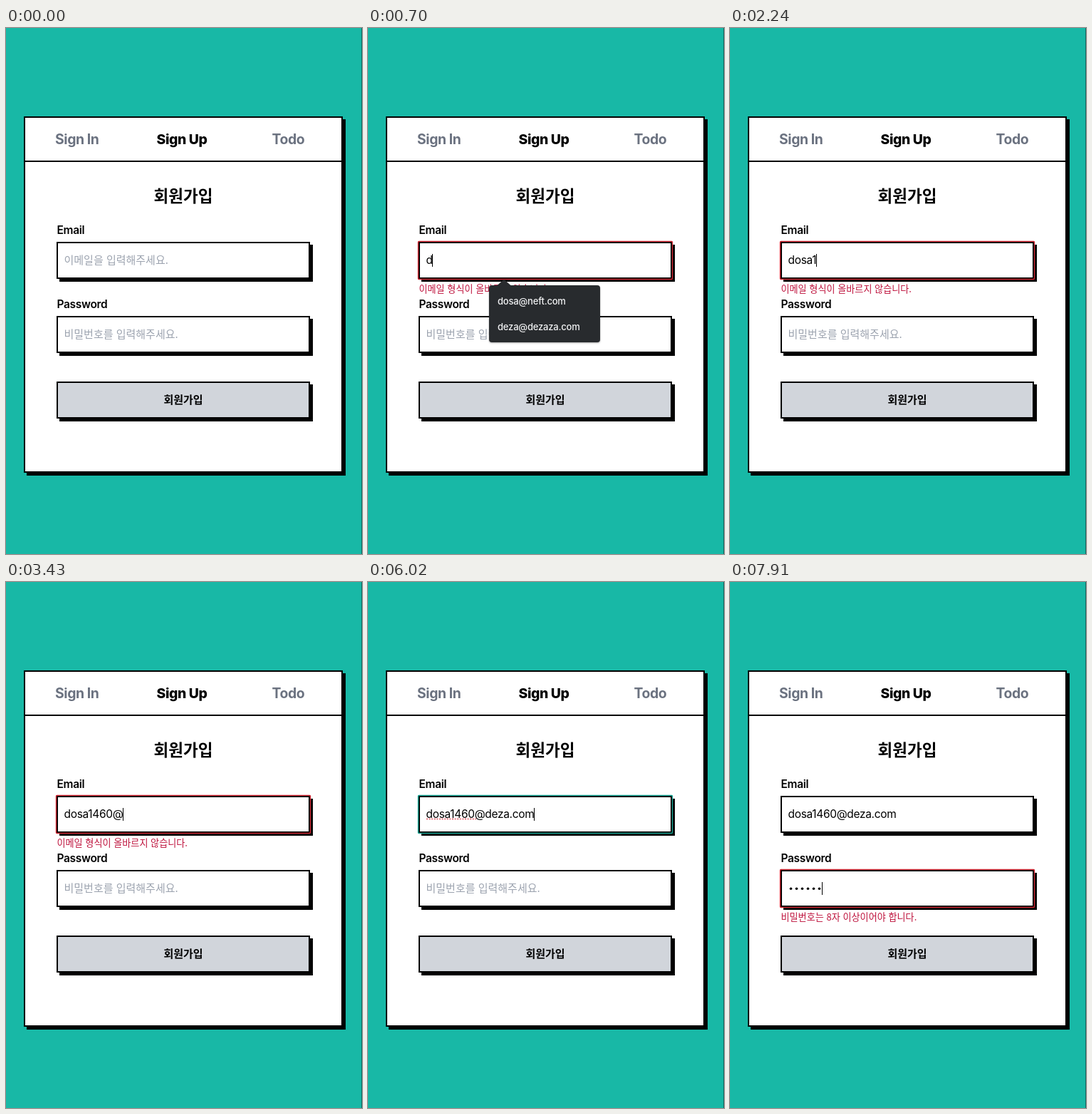
Write an HTML page that moves like this. It is 500x738 px and loops after 8000 ms.

```html
<!DOCTYPE html>
<html lang="ko">
<head>
<meta charset="utf-8">
<title>회원가입</title>
<style>
  html, body { margin: 0; height: 100%; overflow: hidden; background: #18b8a6; }
  svg { display: block; }
  text { font: 15.5px Inter, "Noto Sans CJK KR", sans-serif; letter-spacing: -.021em; white-space: pre; }
  .tab { font-size: 19.4px; font-weight: 700; fill: #6b7280; }
  .tab.on { font-weight: 800; fill: #000; }
  .label { font-weight: 600; }
  .ko { font: 15px "Noto Sans CJK KR", sans-serif; letter-spacing: 0; }
  .hint { fill: #9ca3af; }
  .title { font-size: 22.5px; font-weight: 700; }
  .go { font-weight: 700; }
  .error { font-size: 13.125px; font-weight: 500; fill: #be123c; }
  .mail { font-size: 13px; font-weight: 500; letter-spacing: -.015em; fill: #f1f2f3; }
  .box { fill: #fff; stroke: #000; stroke-width: 2; }
  .ring { fill: none; stroke-width: 1.4; }
</style>
</head>
<body>
<svg id="stage" width="500" height="738" viewBox="0 0 500 738">
  <rect width="500" height="738" fill="#18b8a6"/>
  <rect x="499" width="1" height="738" fill="#0d6b61"/>

  <rect x="29" y="128" width="448" height="500"/>
  <rect class="box" x="26" y="125" width="446" height="498"/>
  <rect x="26" y="186" width="446" height="2"/>
  <text class="tab" x="69" y="163">Sign In</text>
  <text class="tab on" x="211.5" y="163">Sign Up</text>
  <text class="tab" x="373.5" y="163">Todo</text>
  <text class="ko title" x="249" y="244" text-anchor="middle">회원가입</text>

  <text class="label" x="71.5" y="289">Email</text>
  <rect x="75" y="304" width="356" height="52"/>
  <rect class="box" x="72" y="301" width="354" height="50"/>
  <text class="ko hint" id="mailHint" x="81.5" y="331">이메일을 입력해주세요.</text>
  <text id="mail" x="81.5" y="331"></text>
  <line id="spell" x1="82" x2="152" y1="332.5" y2="332.5" stroke="#e0525c" stroke-width="1.6" stroke-dasharray="2 1.6"/>
  <text class="ko error" id="mailError" x="71.5" y="370.5">이메일 형식이 올바르지 않습니다.</text>

  <text class="label" x="71.5" y="393">Password</text>
  <rect x="75" y="408" width="356" height="52"/>
  <rect class="box" x="72" y="405" width="354" height="50"/>
  <text class="ko hint" id="passHint" x="81.5" y="435">비밀번호를 입력해주세요.</text>
  <g id="dots"></g>
  <text class="ko error" id="passError" x="71.5" y="474.5">비밀번호는 8자 이상이어야 합니다.</text>

  <rect x="75" y="500" width="356" height="52"/>
  <rect class="box" x="72" y="497" width="354" height="50" style="fill:#d1d5db"/>
  <text class="ko go" x="249" y="526.5" text-anchor="middle">회원가입</text>

  <rect class="ring" id="ring" x="70.5" width="357" height="53" rx="1"/>
  <rect id="caret" width="1" height="18"/>
  <g id="popup">
    <rect id="panel" x="170" y="361" width="156" rx="4" fill="#282b2e" style="filter:drop-shadow(0 1px 1px #0005)"/>
    <path d="M181 361.5 L189.5 354 Q191 353 192.5 354 L201 361.5Z" fill="#282b2e"/>
    <g id="list"></g>
  </g>
</svg>
<script>
const LOOP = 8000;
const ADDRESS = 'dosa1460@deza.com';
const SAVED = ['dosa@neft.com', 'zccc@', 'vafo@dosa.com', 'vafo@eeeee.com', 'deza@dezaza.com'];
const RED = '#cf2430', TEAL = '#14a594';
const LEFT = 81.5;

// [time, changes]: n = typed address letters, p = password dots
const STEPS = [
  [0, { focus: '', n: 0, p: 0, caret: 1, bad: 1, spell: 0, warn: 0 }],
  [140, { focus: 'mail' }],
  [630, { caret: 0 }],
  [700, { n: 1, caret: 1 }],
  [1050, { n: 2 }],
  [1260, { n: 3 }],
  [1610, { n: 4 }],
  [2170, { caret: 0 }],
  [2240, { n: 5, caret: 1 }],
  [2450, { n: 6 }],
  [2590, { n: 7 }],
  [2730, { n: 8 }],
  [3220, { caret: 0 }],
  [3430, { n: 9, caret: 1 }],
  [3780, { bad: 0 }],
  [3990, { caret: 0 }],
  [4550, { caret: 1, spell: 1 }],
  [4970, { n: 10 }],
  [5040, { n: 11 }],
  [5180, { n: 12 }],
  [5250, { n: 13 }],
  [5530, { n: 14 }],
  [5670, { n: 15 }],
  [5880, { n: 16 }],
  [6020, { n: 17 }],
  [6300, { focus: 'pass', spell: 0 }],
  [6650, { p: 1 }],
  [6720, { warn: 1 }],
  [6930, { p: 2 }],
  [7140, { p: 3 }],
  [7350, { p: 4 }],
  [7630, { p: 5 }],
  [7910, { p: 6 }]
];

const $ = id => document.getElementById(id);
const show = (id, on) => { $(id).style.visibility = on ? 'visible' : 'hidden'; };
const set = (id, attrs) => { for (const k in attrs) $(id).setAttribute(k, attrs[k]); };

function fill(id, count, tag, make) {
  const html = Array.from({ length: count }, (_, i) => make(i)).join('');
  $(id).innerHTML = html;
}

function drawPopup(open, typed) {
  const items = open ? SAVED.filter(s => s.startsWith(typed)) : [];
  show('popup', items.length);
  set('panel', { height: items.length * 36 + 8 });
  $('list').innerHTML = items.map((s, i) =>
    `<text class="mail" x="182" y="${388 + i * 36}">${s}</text>`).join('');
}

function draw(s) {
  const typed = ADDRESS.slice(0, s.n);
  const onMail = s.focus === 'mail';
  $('mail').textContent = typed;
  show('mailHint', !s.n);
  show('mailError', s.n && s.bad);
  show('spell', s.spell);
  show('passHint', !s.p);
  show('passError', s.warn);
  $('dots').innerHTML = Array.from({ length: s.p }, (_, i) =>
    `<circle cx="${85.5 + i * 8}" cy="430.3" r="1.8"/>`).join('');
  show('ring', s.focus);
  set('ring', { y: onMail ? 299.5 : 403.5, stroke: onMail && !s.bad ? TEAL : RED });
  show('caret', s.focus && s.caret);
  const width = onMail ? (s.n ? $('mail').getComputedTextLength() : 0) : s.p * 8;
  set('caret', { x: Math.floor(LEFT + width), y: onMail ? 317 : 421 });
  drawPopup(onMail, typed);
}

let last = -1;
function tick() {
  const t = performance.now() % LOOP;
  const past = STEPS.filter(step => step[0] <= t);
  if (past.length !== last) {
    last = past.length;
    draw(Object.assign({}, ...past.map(step => step[1])));
  }
  requestAnimationFrame(tick);
}
tick();
</script>
</body>
</html>
```
